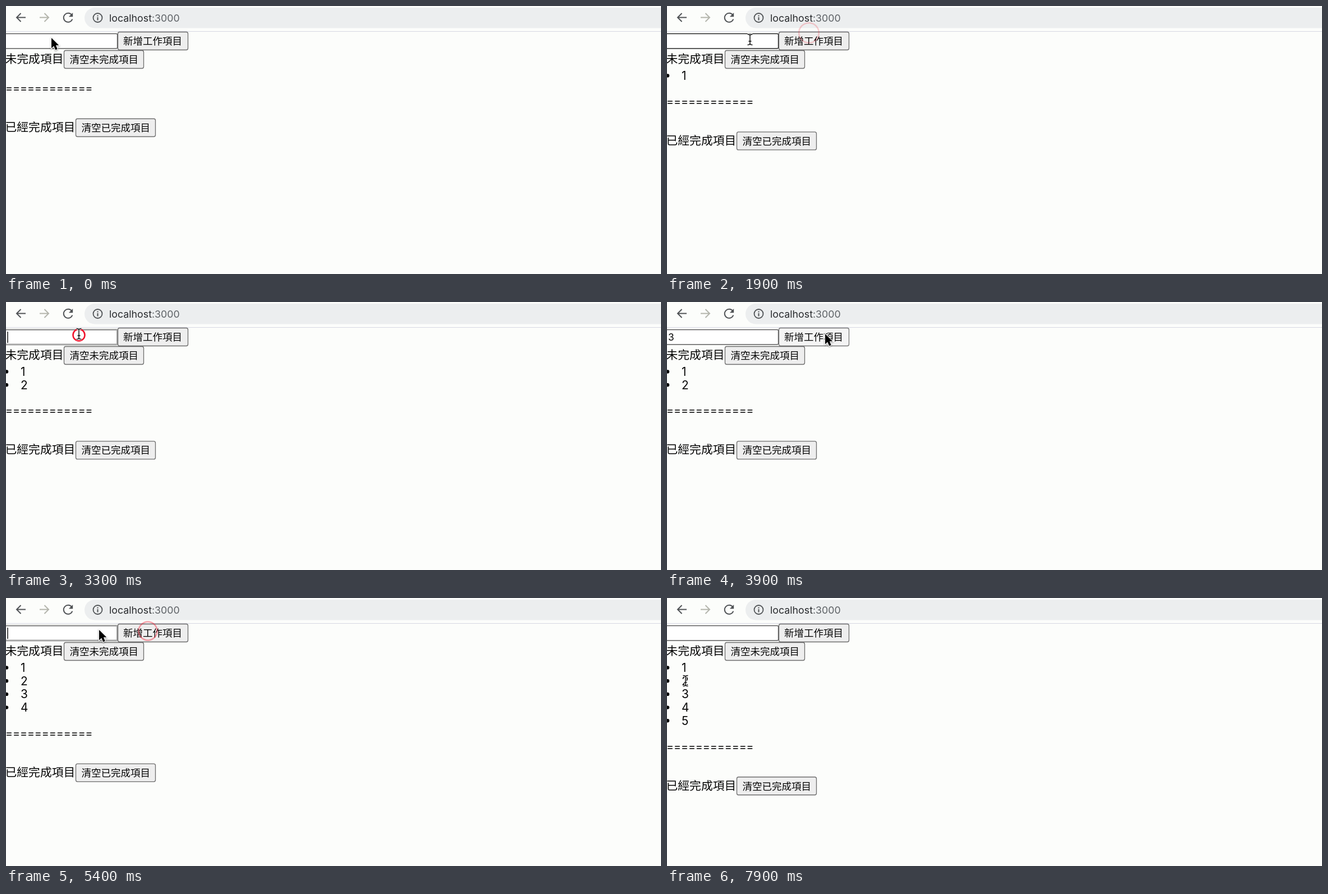
Recreate the animation shown at these times as an HTML page. Size 1168 px wide and 479 px high, loop 8 s.

```html
<!DOCTYPE html>
<html lang="zh-Hant">
<head>
<meta charset="utf-8">
<title>Todo list</title>
<style>
  html, body { margin: 0; width: 100%; height: 100%; overflow: hidden; background: #fcfdfb; }
  svg { display: block; width: 1168px; height: 479px; }
  text { font: 20.8px Inter, "Noto Sans CJK TC", "Noto Sans CJK", sans-serif; fill: #050505; white-space: pre; }
  .button text { font-size: 17.5px; }
  .button rect { fill: #eeeeee; stroke: #6c6c6c; stroke-width: 1.3; }
  .button.hover rect { fill: #e1e1df; stroke: #444; }
  .button.pressed rect { fill: #f4f4f4; stroke: #777; }
  #field { fill: #fff; stroke: #5c5c5c; stroke-width: 1.3; }
  #field.hover { stroke: #262626; }
  #field.focus { stroke: #a5a5a5; stroke-width: 3; }
  .icon { fill: none; stroke: #505356; stroke-width: 2; }
</style>
</head>
<body>
<svg viewBox="0 0 1168 479">
  <path d="M0 45.5H1168" stroke="#d6d7e2"/>
  <rect x="140" y="3" width="1060" height="36.5" rx="18.2" fill="#eceeef"/>
  <g class="icon">
    <path d="M35 20.5H19.5M26.5 13L19 20.5L26.5 28"/>
    <path d="M60 20.5H75.500M68.500 13L76 20.500L68.500 28" stroke="#b4b5ac"/>
    <path d="M117.300 16.200A8 8 0 1 0 118.300 23.500"/>
    <path d="M119.200 12V19.300H111.900Z" fill="#505356" stroke="none"/>
    <circle cx="163.500" cy="21" r="8" stroke-width="1.800"/>
    <path d="M163.500 20V25.500M163.500 16.500V18.500"/>
  </g>
  <text x="184" y="27.500" style="font-size:17.8px;fill:#292b2e">localhost<tspan fill="#5d6165">:3000</tspan></text>

  <rect id="field" x="-9" y="49.500" width="207.500" height="26.500" rx="2"/>
  <text id="typed" x="2" y="69" style="font-size:17.3px"></text>
  <path id="caret" d="M0 53V73" stroke="#000" stroke-width="1.400"/>
  <g class="button" id="add">
    <rect x="199.500" y="46.500" width="125" height="32" rx="3"/>
    <text x="209" y="69">新增工作項目</text>
  </g>
  <text x="-1.500" y="102">未完成項目</text>
  <g class="button">
    <rect x="103.500" y="79.500" width="142" height="32" rx="3"/>
    <text x="113.500" y="102">清空未完成項目</text>
  </g>
  <g id="items"></g>
  <g id="below">
    <text x="-1" y="154" style="font-size:19.6px">============</text>
    <text x="-1.500" y="224">已經完成項目</text>
    <g class="button">
      <rect x="124.500" y="201.500" width="142" height="32" rx="3"/>
      <text x="134.500" y="224">清空已完成項目</text>
    </g>
  </g>

  <g id="rings" fill="none" stroke="#f0142c" stroke-width="2.600"></g>
  <path id="arrow" d="M0 0V18.500L4.300 14.600L7.200 21.500L10.800 20L7.900 13.300H13.300Z"
        stroke="#fff" stroke-width="2.200" paint-order="stroke" style="filter:drop-shadow(0 1px 1px #0006)"/>
  <g id="beam" fill="none">
    <path id="beamShape" d="M-4.500 -9.500Q0 -9.500 0 -7Q0 -9.500 4.500 -9.500M0 -7V7M-4.500 9.500Q0 9.500 0 7Q0 9.500 4.500 9.500M-2.500 3H2.500"
          stroke="#fff" stroke-width="3.500"/>
    <use href="#beamShape" id="beamInk"/>
  </g>
</svg>
<script>
const LOOP = 8000, STEP = 100, LINE = 23.7, RING = 500;
const $ = id => document.getElementById(id);

// Each entry: focus the field, type the digit, press the add button.
const entries = [
  [400, 800, 1400], [2100, 2400, 2700], [3200, 3500, 3900],
  [4400, 4600, 5000], [5400, 5800, 6500]
].map(([focus, type, press]) => ({ focus, type, press, add: press + STEP }));

// Pointer path: time, x, y.
const path = [
  [0, 81, 57], [900, 81, 57], [1300, 253, 46], [1600, 253, 46],
  [1900, 148, 60], [2100, 118, 58], [2400, 118, 58], [2700, 243, 57],
  [2900, 243, 57], [3200, 130, 57], [3600, 130, 57], [3900, 282, 57],
  [4100, 282, 57], [4400, 150, 57], [4700, 150, 57], [5000, 253, 57],
  [5150, 253, 57], [5400, 166, 57], [6000, 166, 57], [6400, 253, 56],
  [6800, 253, 56], [7500, 33, 148], [LOOP, 33, 148]
];

const svgNode = (parent, name, attrs, text = "") => {
  const node = document.createElementNS("http://www.w3.org/2000/svg", name);
  for (const key in attrs) node.setAttribute(key, attrs[key]);
  node.textContent = text;
  return parent.appendChild(node);
};
const show = (node, visible) => node.style.display = visible ? "" : "none";
const moveTo = (node, x, y) => node.setAttribute("transform", `translate(${x} ${y})`);

// The beam is a dark stroke over a white halo of the same shape.
$("beamInk").remove();
svgNode($("beam"), "path", { d: $("beamShape").getAttribute("d"), stroke: "#111", "stroke-width": 1.5 });

const rows = entries.map((entry, i) => {
  const row = svgNode($("items"), "g", {});
  svgNode(row, "circle", { cx: 1, cy: 124.5 + i * LINE, r: 3.2 });
  svgNode(row, "text", { x: 26, y: 132 + i * LINE }, i + 1);
  return row;
});

function pointerAt(t) {
  const i = path.findIndex(key => key[0] > t);
  const [t0, x0, y0] = path[i - 1], [t1, x1, y1] = path[i];
  const p = (t - t0) / (t1 - t0), ease = p * p * (3 - 2 * p);
  return [x0 + (x1 - x0) * ease, y0 + (y1 - y0) * ease];
}

const rings = entries.flatMap(e => [e.focus + STEP, e.add]).map(start => {
  const [cx, y] = pointerAt(start);
  return { start, node: svgNode($("rings"), "circle", { cx, cy: y + 2 }) };
});

function draw(t) {
  const [x, y] = pointerAt(t);
  const count = entries.filter(e => t >= e.add).length;
  rows.forEach((row, i) => show(row, i < count));
  moveTo($("below"), 0, count * LINE);

  const entry = entries[count];
  const focused = entry && t >= entry.focus && t < entry.press;
  const typed = entry && t >= entry.type;
  const pressingField = entry && t === entry.focus;
  const overField = x < 198 && y > 48 && y < 77;
  const beam = overField ? t >= 400 && !pressingField : x < 45 && y > 112;

  $("typed").textContent = typed ? count + 1 : "";
  $("field").setAttribute("class", focused ? "focus" : overField && beam ? "hover" : "");
  show($("caret"), focused && (t - (typed ? entry.type : entry.focus)) % 1000 < 500);
  moveTo($("caret"), typed ? 14 : 3, 0);

  const overAdd = x >= 199 && x < 325 && y < 79;
  const pressed = entry && t >= entry.press;
  $("add").setAttribute("class", "button" + (pressed ? " pressed" : overAdd ? " hover" : ""));

  for (const { start, node } of rings) {
    const p = (t - start) / RING;
    show(node, p >= 0 && p < 1);
    if (p < 0 || p >= 1) continue;
    node.setAttribute("r", 10.5 + 8 * (1 - (1 - p) ** 1.5));
    node.setAttribute("opacity", 1 - p);
  }

  show($("beam"), beam);
  show($("arrow"), !beam);
  moveTo($(beam ? "beam" : "arrow"), x, y);
}

function tick() {
  draw(Math.floor(performance.now() % LOOP / STEP) * STEP);
  requestAnimationFrame(tick);
}
tick();
</script>
</body>
</html>
```
